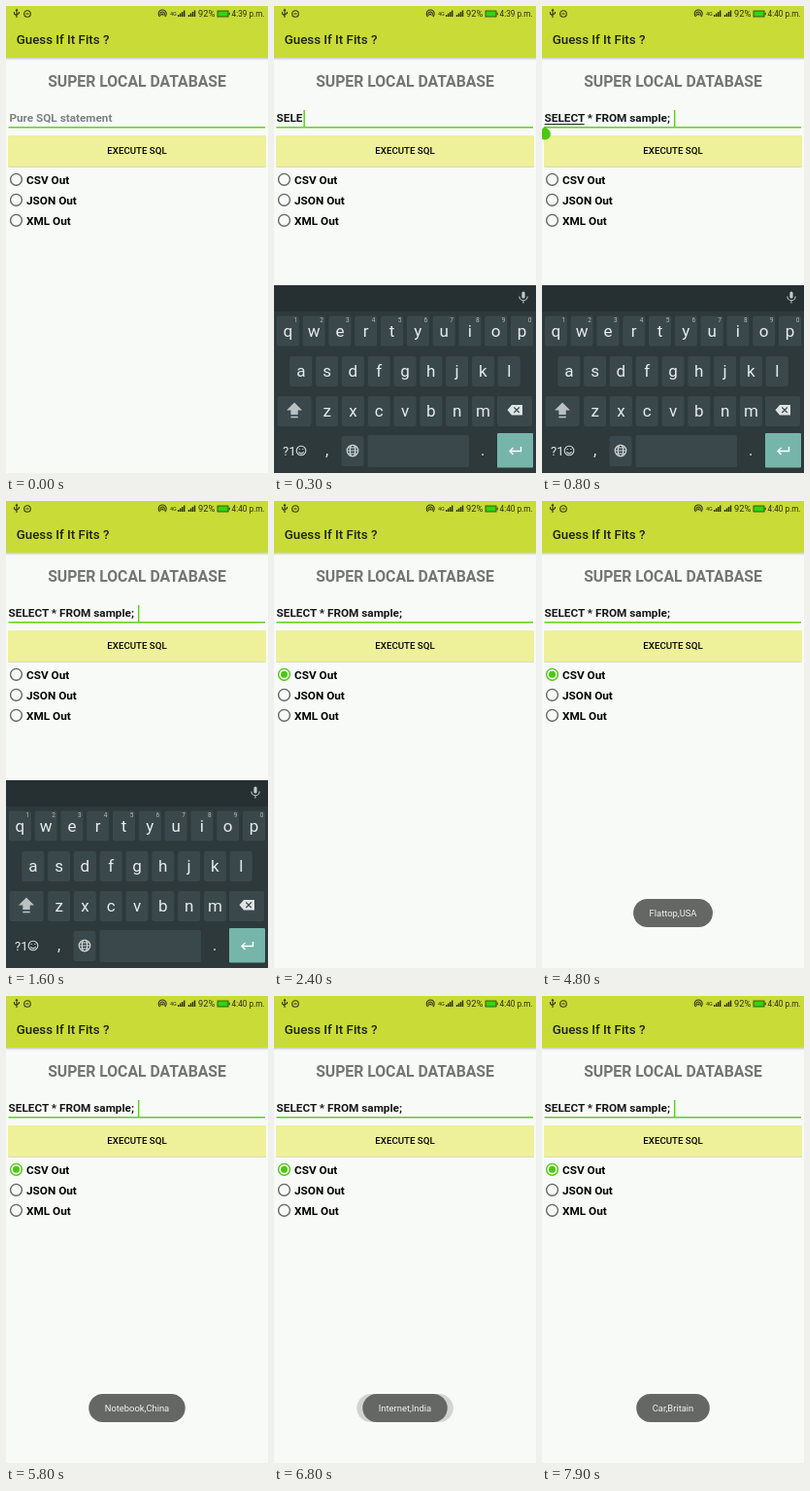
An HTML page that plays this animation: 270x480 px, repeating every 8000 ms.

```html
<!DOCTYPE html>
<html lang="en">
<head>
<meta charset="utf-8">
<title>Local database demo</title>
<style>
html, body { margin: 0; width: 100%; height: 100%; overflow: hidden; background: #f8faf8; }
svg { display: block; width: 100vw; height: 100vh; }
text { font-family: Roboto, Arial, sans-serif; white-space: pre; }
.bold { font-weight: 700; font-size: 11.75px; }
.mid { text-anchor: middle; }
.line { fill: none; stroke-width: 1.1; }
</style>
</head>
<body>
<svg viewBox="0 0 270 480">
  <defs>
    <linearGradient id="shade" x2="0" y2="1">
      <stop offset="0" stop-color="#000" stop-opacity=".2"/>
      <stop offset="1" stop-color="#000" stop-opacity="0"/>
    </linearGradient>
  </defs>
  <rect width="270" height="480" fill="#f8faf8"/>

  <rect y="53" width="270" height="3" fill="url(#shade)"/>
  <rect width="270" height="53" fill="#c9db36"/>
  <text x="10.7" y="39" font-size="13.3" font-weight="500" fill="#1d2108">Guess If It Fits ?</text>

  <g class="line" stroke="#34390f" stroke-width=".9">
    <path d="M11 4V12M8.5 6V8L11 10M13.5 6V7.5L11 9M10 5L11 3.5L12 5"/>
    <circle cx="22" cy="8" r="3.3"/><path d="M20.5 8H23.5"/>
    <path d="M158.6 11A4 4 0 1 1 163.8 11M159.7 9.8A2.2 2.2 0 1 1 162.7 9.8"/>
  </g>
  <g fill="#2a2e0c">
    <circle cx="161.2" cy="8.4" r="1"/>
    <text x="169" y="9.5" font-size="5.5">4G</text>
    <path id="bars" d="M177 11V9H178.4V11ZM179 11V7.5H180.4V11ZM181 11V6H182.4V11ZM183 11V4.5H184.4V11Z"/>
    <use href="#bars" x="10.8"/>
    <text x="198" y="11.4" font-size="9.3">92%</text>
    <text id="clock" x="232.6" y="11.3" font-size="8.2"></text>
  </g>
  <rect x="218" y="5" width="11" height="6" fill="#2fd60f" stroke="#34390f" stroke-width=".8"/>
  <rect x="229.5" y="6.7" width="1.2" height="2.6" fill="#34390f"/>

  <text class="mid" x="135" y="82.5" font-size="15.75" font-weight="700" fill="#757575">SUPER LOCAL DATABASE</text>
  <text id="field" class="bold" y="119"></text>
  <rect id="compose" x="2.6" y="121" width="41" height="1" fill="#222"/>
  <rect x="2.5" y="124" width="264.5" height="1.5" fill="#5fd21a"/>
  <rect id="cursor" y="107" width="1.5" height="17" fill="#5fd21a"/>

  <rect x="2" y="133.5" width="266" height="32.5" rx="1.5" fill="#d8dac2"/>
  <rect x="2" y="133" width="266" height="32" rx="1.5" fill="#eef09a"/>
  <text class="mid" x="135" y="152.3" font-size="9.7" font-weight="500">EXECUTE SQL</text>
  <path id="handle" d="M3 123.8L7.2 127.5A5.9 5.9 0 1 1 -1.2 127.5Z" fill="#4cc80c"/>
  <g id="radios"></g>

  <g class="toast"><rect/><text/></g>
  <g class="toast"><rect/><text/></g>

  <g id="keyboard">
    <rect y="287" width="270" height="193" fill="#2d393b"/>
    <rect y="287" width="270" height="27" fill="#263032"/>
    <g class="line" stroke="#c3cacb">
      <rect x="255.4" y="293.5" width="3.2" height="7" rx="1.6" fill="#c3cacb" stroke="none"/>
      <path d="M252.8 298.5A4.2 4.2 0 0 0 261.2 298.5M257 302.8V305.5"/>
    </g>
    <g id="keys"></g>
    <rect x="96.5" y="441" width="104.5" height="33" rx="2" fill="#3b484b"/>
    <rect x="230" y="439" width="37" height="35.5" rx="1" fill="#76b5aa"/>
    <path d="M21 407.5L29 415.5H24.7V420H17.3V415.5H13Z" fill="#b9c1c2"/>
    <path d="M17.3 421.7H24.7V423.3H17.3Z" fill="#b9c1c2"/>
    <path d="M240.5 415.3L245 410H256V420.6H245Z" fill="#dfe4e4"/>
    <path class="line" d="M247.3 412.5L252.8 418M252.8 412.5L247.3 418" stroke="#3b484b"/>
    <g class="line" stroke="#d5dcdc">
      <circle cx="28" cy="457" r="4.8"/>
      <path d="M25.3 458.3Q28 461.5 30.7 458.3M26.2 455V456M29.8 455V456"/>
      <circle cx="81" cy="457" r="5.8"/>
      <ellipse cx="81" cy="457" rx="2.7" ry="5.8"/>
      <path d="M75.2 457H86.8M76 454H86M76 460H86"/>
      <path d="M254.5 453V457.5H243.5M246.5 454L243 457.5L246.5 461" stroke="#fff" stroke-width="1.4"/>
    </g>
    <g fill="#e6ebeb" font-size="13">
      <text x="9" y="461.5">?1</text>
      <text x="53" y="462" font-size="16">,</text>
      <text x="213" y="462" font-size="16">.</text>
    </g>
  </g>
</svg>
<script>
const $ = id => document.getElementById(id);
const LOOP = 8000, QUERY = 'SELECT * FROM sample; ';
const clamp = v => Math.max(0, Math.min(1, v));
const show = (el, on) => el.setAttribute('visibility', on ? 'visible' : 'hidden');
const set = (el, attrs) => Object.entries(attrs).forEach(([k, v]) => el.setAttribute(k, v));

// [start of the crossfade, message]
const toasts = [
  [2500, 'Ovan,UAE'], [3300, 'Laptop,Japan'], [4300, 'Flattop,USA'],
  [5400, 'Notebook,China'], [6500, 'Internet,India'], [7500, 'Car,Britain']
];

$('radios').innerHTML = ['CSV', 'JSON', 'XML'].map((name, i) => {
  const y = 178.3 + 21 * i;
  return `<circle class="line" cx="10.5" cy="${y}" r="5.9" style="stroke-width:1.4" stroke="#666"/>
    <text class="bold" x="21" y="${y + 4.3}">${name} Out</text>`;
}).join('') + '<circle id="dot" cx="10.5" cy="178.3" r="3.5" fill="#4cc80c"/>';

const key = (x, y, w = 23) =>
  `<rect x="${x - w / 2}" y="${y - 15.5}" width="${w}" height="31" rx="2" fill="#3b484b"/>`;

$('keys').innerHTML = [['qwertyuiop', 14.3, 334], ['asdfghjkl', 27.8, 375.5], ['zxcvbnm', 54.6, 416.5]]
  .map(([row, x0, y], r) => [...row].map((c, i) => {
    const x = x0 + 26.8 * i;
    const digit = r ? '' : `<text class="mid" x="${x + 8}" y="${y - 9.5}" font-size="6.5" fill="#b3bcbd">${(i + 1) % 10}</text>`;
    return key(x, y) + `<text class="mid" x="${x}" y="${y + 5.8}" font-size="17" fill="#e6ebeb">${c}</text>` + digit;
  }).join('')).join('') + key(21, 416.5, 35) + key(248, 416.5, 36) + key(81, 457.5);

const ring = $('radios').querySelector('circle');
const [oldToast, newToast] = document.querySelectorAll('.toast');
for (const { children: [pill, label] } of [oldToast, newToast]) {
  set(pill, { y: 409, height: 29, rx: 14.5, fill: '#656765' });
  set(label, { class: 'mid', x: 135, y: 427, 'font-size': 9.4, fill: '#f2f2f2' });
}

function drawToast(el, name, alpha) {
  const [pill, label] = el.children;
  label.textContent = name;
  const width = label.getComputedTextLength() + 33;
  set(pill, { x: 135 - width / 2, width });
  el.setAttribute('opacity', alpha);
}

function drawToasts(t) {
  const i = toasts.filter(([start]) => t >= start).length - 1;
  const [start, name] = toasts[i] || [t, ''];
  const [, previous] = toasts[i - 1] || [0, ''];
  drawToast(oldToast, previous, previous ? clamp(1 - (t - start) / 400) : 0);
  drawToast(newToast, name, clamp((t - start) / 300));
}

function draw(time) {
  const t = Math.floor(time / 100) * 100;
  const field = $('field');
  const typed = QUERY.slice(0, Math.round(clamp((t - 200) / 500) * QUERY.length));
  field.textContent = typed || 'Pure SQL statement';
  set(field, { x: typed ? 2.6 : 3.4, fill: typed ? '#161616' : '#808080' });

  const blink = t % 400 < 200;
  const width = typed ? field.getComputedTextLength() : 0;
  $('cursor').setAttribute('x', 3.6 + width);
  show($('cursor'), t >= 100 && (t < 800 || (t < 2000 ? blink : !blink)));
  show($('compose'), t >= 800 && t < 1000);
  show($('handle'), t >= 800 && t < 1000);

  const checked = t >= 2400;
  ring.setAttribute('stroke', checked ? '#4cc80c' : '#666');
  show($('dot'), checked);

  const up = Math.min(clamp(t / 200), clamp((2000 - t) / 200));
  $('keyboard').setAttribute('transform', `translate(0 ${193 * (1 - up)})`);
  $('clock').textContent = (t < 400 ? '4:39' : '4:40') + ' p.m.';
  drawToasts(t);
}

function tick() {
  draw(performance.now() % LOOP);
  requestAnimationFrame(tick);
}
tick();
</script>
</body>
</html>
```
